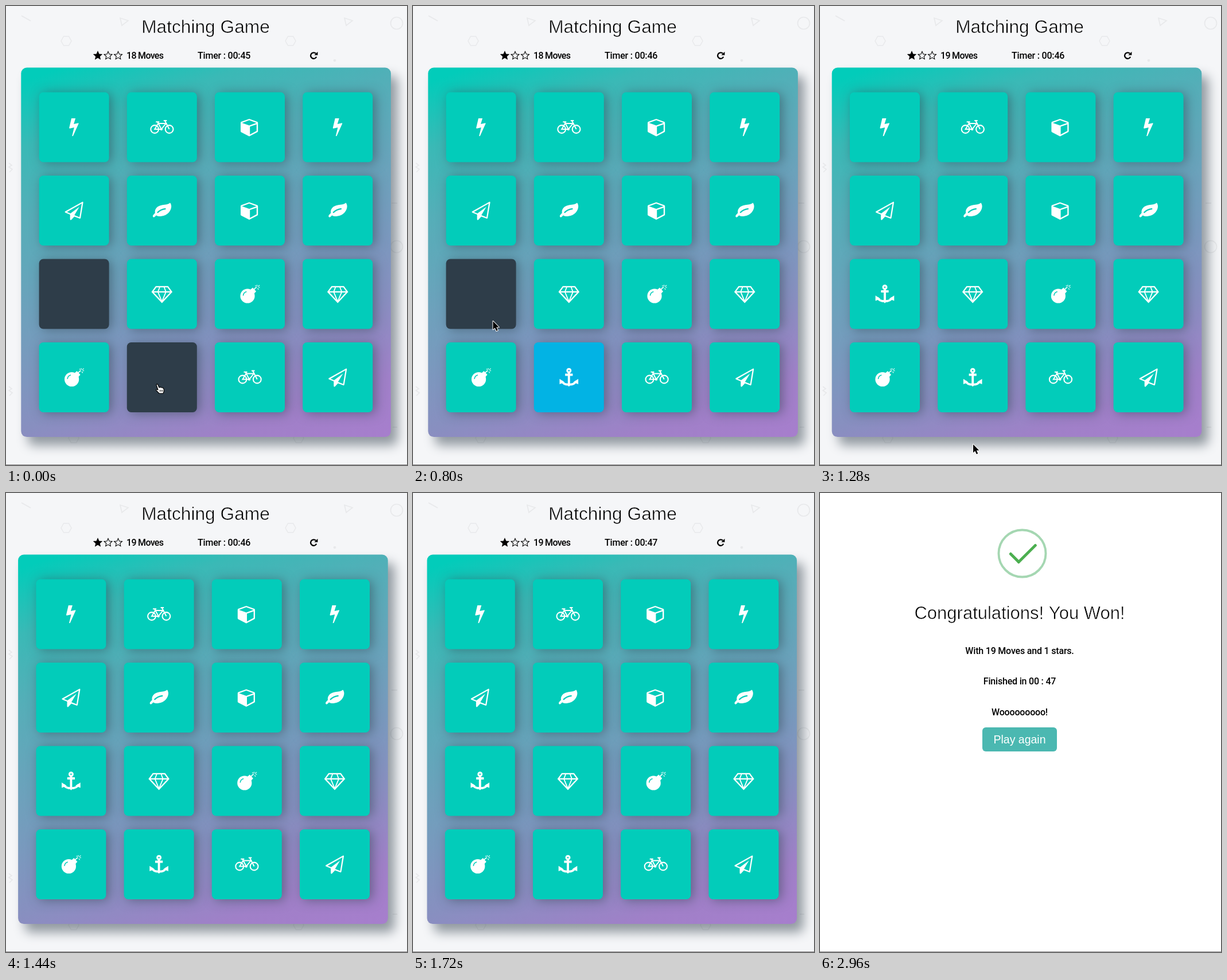
These frames come from a looping animation (699x801 px, 3000 ms). An HTML page with a canvas:

```html
<!DOCTYPE html>
<html lang="en">
<head>
<meta charset="utf-8">
<title>Matching Game</title>
<style>
html, body { margin: 0; width: 100%; height: 100%; overflow: hidden; background: #f5f6f8; }
canvas { display: block; }
</style>
</head>
<body>
<canvas id="stage" width="699" height="801"></canvas>
<script>
const c = document.getElementById('stage').getContext('2d');
const LOOP = 3000, WIN_AT = 1920, OPEN_1 = 130, OPEN_2 = 880, MATCH = 1000;
const TEAL = '#02ccba', BLUE = '#02b3e4', DARK = '#2e3d49', PAPER = '#f5f6f8';
const SANS = '"Liberation Sans", Arial, sans-serif';
const BODY = '500 16px Roboto, "Liberation Sans", sans-serif';
const BOARD = [
  'bolt', 'bike', 'cube', 'bolt',
  'plane', 'leaf', 'cube', 'leaf',
  'anchor', 'gem', 'bomb', 'gem',
  'bomb', 'anchor', 'bike', 'plane'
];

const clamp = v => Math.max(0, Math.min(1, v));
const mix = (a, b, p) => a + (b - a) * p;
const smooth = p => p * p * (3 - 2 * p);

// CSS "ease" curve
function ease(x) {
  let lo = 0, hi = 1;
  for (let i = 0; i < 16; i++) {
    const u = (lo + hi) / 2, v = 1 - u;
    if (3 * v * v * u * 0.25 + 3 * v * u * u * 0.25 + u * u * u < x) lo = u; else hi = u;
  }
  const v = 1 - lo;
  return 3 * v * v * lo * 0.1 + 3 * v * lo * lo + lo * lo * lo;
}

// keys: [time, value, value...]
function tween(keys, t, curve) {
  if (t <= keys[0][0]) return keys[0].slice(1);
  for (let i = 1; i < keys.length; i++) {
    const a = keys[i - 1], b = keys[i];
    if (t < b[0]) {
      const p = curve((t - a[0]) / (b[0] - a[0]));
      return a.slice(1).map((v, k) => mix(v, b[k + 1], p));
    }
  }
  return keys[keys.length - 1].slice(1);
}

function at(x, y, draw) {
  c.save();
  c.translate(x, y);
  draw();
  c.restore();
}

function box(x, y, w, h, r, fill) {
  c.beginPath();
  c.roundRect(x, y, w, h, r);
  c.fillStyle = fill;
  c.fill();
}

function shadow(x, y, blur) {
  c.shadowColor = 'rgba(46,61,73,0.5)';
  c.shadowOffsetX = x;
  c.shadowOffsetY = y;
  c.shadowBlur = blur;
}

function fill(d, color = '#fff', rule = 'nonzero') {
  c.fillStyle = color;
  c.fill(new Path2D(d), rule);
}

function line(d, width, color = '#fff') {
  c.strokeStyle = color;
  c.lineWidth = width;
  c.stroke(new Path2D(d));
}

function ring(x, y, r, width, color = '#fff') {
  c.beginPath();
  c.arc(x, y, r, 0, 7);
  c.strokeStyle = color;
  c.lineWidth = width;
  c.stroke();
}

function disc(x, y, r, color = '#fff') {
  c.beginPath();
  c.arc(x, y, r, 0, 7);
  c.fillStyle = color;
  c.fill();
}

function text(s, x, y, font, align = 'left', color = '#000', spacing = 0) {
  c.font = font;
  c.textAlign = align;
  c.fillStyle = color;
  c.letterSpacing = spacing + 'px';
  c.fillText(s, x, y);
}

// a light weight: the outline is trimmed with the paper colour
function heading(s, y, size, paper) {
  text(s, 348, y, size + 'px ' + SANS, 'center');
  c.strokeStyle = paper;
  c.lineWidth = 0.7;
  c.strokeText(s, 348, y);
}

const icons = {
  bolt() {
    fill('M-4.5-15.5H2.5L-.5-5.6L7.5-7.3Q8.2-7 8-6.2L-1.8 15.6H-3.4L.2 .4L-7.5 2.2Q-8.6 2-8.4 1Z');
  },
  bike() {
    ring(-12.6, 3.5, 6.9, 2.1);
    ring(12.8, 3.5, 6.9, 2.1);
    line('M-12.6 3.5H-1L7-6.5H-6.5ZM-1 3.5L-7.5-9M-10.5-9.3H-4.5M3-11.5H8.5M5-11.5L12.8 3.5', 1.9);
    disc(-1, 3.5, 2.2);
  },
  cube() {
    fill('M-1-14.6L13-9.4Q14.2-8.8 14.2-7.4V7Q14.2 8.2 13 8.8L-1 16L-15 8.8Q-16 8.2-16 7V-7.4Q-16-8.8-15-9.4Z' +
      'M-1-12.2L11.6-7.6L-1-3L-13.6-7.6ZM.2-.9L11.8-5.1V6.4L.2 12.7Z', '#fff', 'evenodd');
  },
  plane() {
    fill('M14.9-15.6Q16.3-15.6 16-14L11.5 13Q11 14.4 9.9 14.1L.5 10.4L-4.9 16.2Q-6.6 17-6.9 15.2V6.9L-15.4 3.4Q-16.7 2.4-15.6 1.4Z' +
      'M9.5 11.6L13.4-12.3L-12.4 2.6L-6.3 5.1L9.2-6.4L.6 7.9Z', '#fff', 'evenodd');
  },
  leaf() {
    fill('M14-13.5C11-10.3 6-10.6 1-9.8C-8-8.5-13-3-12 4C-13 6-16 7.5-16 9.7C-15 13-13 12-10 8.2C-7 10.3-3 10.3-1 9.8C10 8.6 16.6 0 16.4-8C16-11 15-13.5 14-13.5Z');
    line('M-8 3.8C-4-.6 0-2.7 6.6-3.2', 2.2, TEAL);
  },
  gem() {
    line('M-10.2-12.6H10.2L16.8-3.6L0 14.2L-16.8-3.6ZM-16.8-3.6H16.8', 2.3);
    line('M-3.6-12.6L-7-3.6L0 13.4L7-3.6L3.6-12.6', 1.8);
  },
  bomb() {
    disc(-4, 3.5, 12.6);
    fill('M1-7.5L5-11L11-4.5L7 0Z');
    line('M7-7Q9-11 12-11.5', 1.6);
    line('M12.5-16V-13.2M9.5-14.8L11-13.2M17-15.4L14.3-13M15-11.5H17.5M13.6-10L15.2-7.6', 1.1);
    line('M-11.5 3Q-11-2.8-5.6-4', 1.5, TEAL);
  },
  anchor() {
    ring(0, -11.7, 2.9, 3.2);
    line('M0-9V13M-6.6-4.5H6.6', 3.9);
    line('M-12.6 6.4C-9 14.8 9 14.8 12.6 6.4', 3.7);
    fill('M-16.3 12V2.8L-7.5 8.4ZM16.3 12V2.8L7.5 8.4ZM-4 12L0 16.2L4 12Z');
  }
};

function star(x, solid) {
  c.beginPath();
  for (let i = 0; i < 10; i++) {
    const a = i * Math.PI / 5 - Math.PI / 2, r = i % 2 ? 3.4 : 7.3;
    c.lineTo(x + r * Math.cos(a), 86.7 + r * Math.sin(a));
  }
  c.closePath();
  c.lineWidth = 1.1;
  c.strokeStyle = c.fillStyle = '#000';
  if (solid) c.fill();
  c.stroke();
}

function hexagon(x, y) {
  at(x, y, () => line('M-9 0L-4.5-8H4.5L9 0L4.5 8H-4.5Z', 1.5, '#e8e9eb'));
}

function backdrop() {
  const pale = '#e8e9eb';
  c.fillStyle = PAPER;
  c.fillRect(0, 0, 699, 801);
  line('M27 17L43 26', 2, pale);
  for (const x of [205, 596]) {
    at(x, 27, () => line('M-6-6L8-1.5L-3 7Z', 1.7, pale));
    hexagon(x - 100, 61);
  }
  hexagon(118, 754);
  hexagon(510, 754);
  for (const y of [0, 390]) {
    ring(681, 30 + y, 10.5, 1.7, pale);
    at(7, 282 + y, () => line('M-2-8L3-4L-2-1L4 3L-1 8', 1.7, pale));
  }
  line('M672 344H682M674 735H682', 2, pale);
  disc(573, 95, 2.3, pale);
}

function header(t) {
  heading('Matching Game', 47, 31.7, PAPER);
  star(160, true);
  star(178, false);
  star(195.5, false);
  text((t < MATCH ? 18 : 19) + ' Moves', 210, 92, BODY, 'left', '#000', -0.7);
  text('Timer : 00:' + (t < 680 ? 45 : t < 1680 ? 46 : 47), 334, 92, BODY, 'left', '#000', -0.2);
  c.beginPath();
  c.arc(536.3, 86.6, 5.2, 0.4, 5.5);
  c.lineWidth = 2.3;
  c.strokeStyle = '#000';
  c.stroke();
  fill('M543.4 79.8V85.8H537.3Z', '#000');
}

function card(i, t) {
  const x = 118.6 + (i % 4) * 153.2, y = 211.5 + (i >> 2) * 145.5;
  const open = i === 8 ? OPEN_2 : i === 13 ? OPEN_1 : -LOOP;
  const p = clamp((t - open) / (i === 8 ? 260 : 360));
  const shown = p >= 0.5;
  const hidden = i === 8 || i === 13;
  const color = !shown ? DARK : hidden && t < MATCH ? BLUE : TEAL;
  at(x, y, () => {
    c.scale(Math.max(0.02, Math.abs(Math.cos(Math.PI * smooth(p)))), 1);
    c.save();
    shadow(4.9, 2, 19.5);
    box(-61, -61, 122, 122, 7.5, color);
    c.restore();
    if (shown) icons[BOARD[i]]();
  });
}

function deckPaint() {
  const a = 160 * Math.PI / 180, half = 413.5;
  const gx = Math.sin(a) * half, gy = -Math.cos(a) * half;
  const g = c.createLinearGradient(348.5 - gx, 429.8 - gy, 348.5 + gx, 429.8 + gy);
  const stops = [[0, TEAL], [0.03, TEAL], [0.16, '#3ab9b6'], [0.3, '#55aeb8'], [0.5, '#6fa0bc'],
    [0.72, '#888fc0'], [0.88, '#a080c8'], [1, '#a77ecd']];
  for (const [p, color] of stops) g.addColorStop(p, color);
  return g;
}

function deck(t) {
  const [dx] = tween([[1060, 0], [1120, -2], [1220, -5.3], [1300, -5.7], [1440, -5.2], [1720, -1.8], [1860, 0]], t, p => p);
  at(dx, 0, () => {
    c.save();
    shadow(11.7, 14.6, 19.5);
    box(26.3, 107.5, 644.6, 644.6, 10, deckPaint());
    c.restore();
    BOARD.forEach((_, i) => card(i, t));
  });
}

function cursor(t) {
  if (t > 1400) return;
  const [x, y] = tween([
    [320, 264, 660], [760, 139.5, 550], [1060, 139.5, 550], [1270, 267, 765], [1300, 267, 765], [1400, 280, 810]
  ], t, smooth);
  const hand = t < OPEN_1 + 80 || (t > 830 && t < 930);
  c.lineJoin = 'round';
  at(x, y, () => {
    if (hand) {
      const d = 'M-2 1Q-1-1 .6 .6L3 6L5 5L7 6L9 6L11 8L11.5 12L10 16H3L-2 11Q-3 9-1 9L1 10Z';
      fill(d);
      line(d, 1.2, '#000');
      line('M4.5 10V13M6.8 10V13M9 10V13', 0.9, '#000');
    } else {
      const d = 'M0 0V14.5L3.3 11.5L5.8 17L8.3 16L5.8 10.6H10.3Z';
      line(d, 2, '#fff');
      fill(d, '#000');
    }
  });
  c.lineJoin = 'miter';
}

function bar(x, y, w, angle) {
  if (w <= 0) return;
  at(x, y, () => {
    c.rotate(angle);
    box(-w / 2, -2.5, w, 5, 2, '#4caf50');
  });
}

function check(t) {
  const p = (t - WIN_AT) / 7.5;
  at(313.4, 66.4, () => {
    c.scale(0.977, 0.977);
    ring(40, 40, 42, 4, '#a5d7b2');
    const [left, top, w] = tween([[54, 1, 19, 0], [70, -8, 37, 50], [84, 21, 48, 17], [100, 14, 45.5, 25]], p, ease);
    bar(left + w / 2, top + 2.5, w, Math.PI / 4);
    const [right, top2, w2] = tween([[65, 46, 54, 0], [84, 0, 35, 55], [100, 8, 38, 47]], p, ease);
    bar(80 - right - w2 / 2, top2 + 2.5, w2, -Math.PI / 4);
  });
}

function winScreen(t) {
  c.fillStyle = '#fff';
  c.fillRect(0, 0, 699, 801);
  check(t);
  heading('Congratulations! You Won!', 220, 31, '#fff');
  text('With 19 Moves and 1 stars.', 348, 280.5, BODY, 'center', '#000', -0.2);
  text('Finished in 00 : 47', 348, 334, BODY, 'center', '#000', -0.2);
  text('Wooooooooo!', 348, 388, BODY, 'center', '#000', -0.2);
  box(283, 409, 130, 42, 6, '#4bb8b1');
  text('Play again', 348, 436.5, '19.5px ' + SANS, 'center', '#fff');
}

function frame(now) {
  const t = now % LOOP;
  if (t < WIN_AT) {
    backdrop();
    header(t);
    deck(t);
    cursor(t);
  } else {
    winScreen(t);
  }
  c.fillStyle = '#8c8a8c';
  c.fillRect(0, 800, 699, 1);
}

const start = performance.now();
function tick() {
  frame(performance.now() - start);
  requestAnimationFrame(tick);
}
tick();
</script>
</body>
</html>
```
